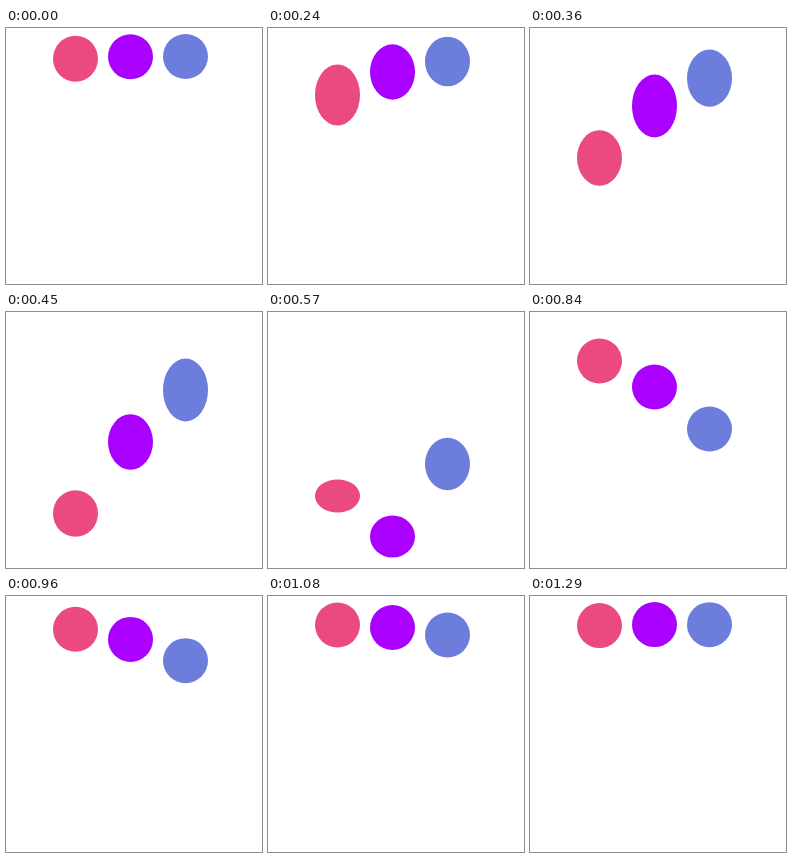
An HTML page with a canvas that plays this animation: 256x256 px, repeating every 1320 ms.

```html
<!DOCTYPE html>
<html lang="en">
<head>
<meta charset="utf-8">
<title>Bouncing balls</title>
<style>
  html, body { margin: 0; width: 100%; height: 100%; overflow: hidden; background: #fff; }
  canvas { display: block; width: 100vw; height: 100vh; }
</style>
</head>
<body>
<canvas id="stage" width="256" height="256"></canvas>
<script>
const LOOP = 1320, STEP = 30, STAGGER = 90, RADIUS = 22.5;

const balls = [
  { x: 69.5, color: '#ea4a80' },
  { x: 124.5, color: '#aa00ff' },
  { x: 179.5, color: '#6c7ddc' }
];

// Each key is [time in ms, value].
const centerKeys = [
  [0, 30.7], [60, 33.5], [150, 44], [240, 67], [270, 78], [360, 130],
  [390, 152], [450, 201.5], [480, 224.5], [510, 227], [540, 211],
  [570, 184], [660, 117], [750, 75], [840, 49], [900, 39], [990, 31.5],
  [1080, 29], [1140, 28.5], [1200, 28.6], [1290, 29.6]
];
const heightKeys = [
  [0, 45.9], [280, 63.5], [465, 45], [547, 28.5], [630, 45], [1305, 45]
];

const ctx = document.getElementById('stage').getContext('2d');

function keyAt(keys, i) {
  const n = keys.length, turn = Math.floor(i / n);
  const [t, v] = keys[i - turn * n];
  return [t + turn * LOOP, v];
}

function segment(keys, t) {
  let i = keys.length - 1;
  while (keys[i][0] > t) i--;
  const a = keyAt(keys, i), b = keyAt(keys, i + 1);
  return { i, a, b, u: (t - a[0]) / (b[0] - a[0]) };
}

function linear(keys, t) {
  const { a, b, u } = segment(keys, t);
  return a[1] + (b[1] - a[1]) * u;
}

// Tangent of the parabola through a key and its two neighbours.
function slope(keys, i) {
  const [t0, v0] = keyAt(keys, i - 1);
  const [t1, v1] = keyAt(keys, i);
  const [t2, v2] = keyAt(keys, i + 1);
  const before = (v1 - v0) / (t1 - t0), after = (v2 - v1) / (t2 - t1);
  return (before * (t2 - t1) + after * (t1 - t0)) / (t2 - t0);
}

function smooth(keys, t) {
  const { i, a, b, u } = segment(keys, t);
  const span = b[0] - a[0], w = 1 - u;
  return a[1] * w * w * (1 + 2 * u) + b[1] * u * u * (3 - 2 * u)
    + span * u * w * (slope(keys, i) * w - slope(keys, i + 1) * u);
}

function draw(time) {
  ctx.fillStyle = '#fff';
  ctx.fillRect(0, 0, 256, 256);
  balls.forEach(({ x, color }, i) => {
    const t = (time - i * STAGGER + LOOP) % LOOP;
    ctx.fillStyle = color;
    ctx.beginPath();
    ctx.ellipse(x, smooth(centerKeys, t), RADIUS, linear(heightKeys, t) / 2, 0, 0, Math.PI * 2);
    ctx.fill();
  });
}

const start = performance.now();

function tick() {
  const elapsed = (performance.now() - start) % LOOP;
  draw(Math.floor(elapsed / STEP) * STEP);
  requestAnimationFrame(tick);
}
tick();
</script>
</body>
</html>
```
